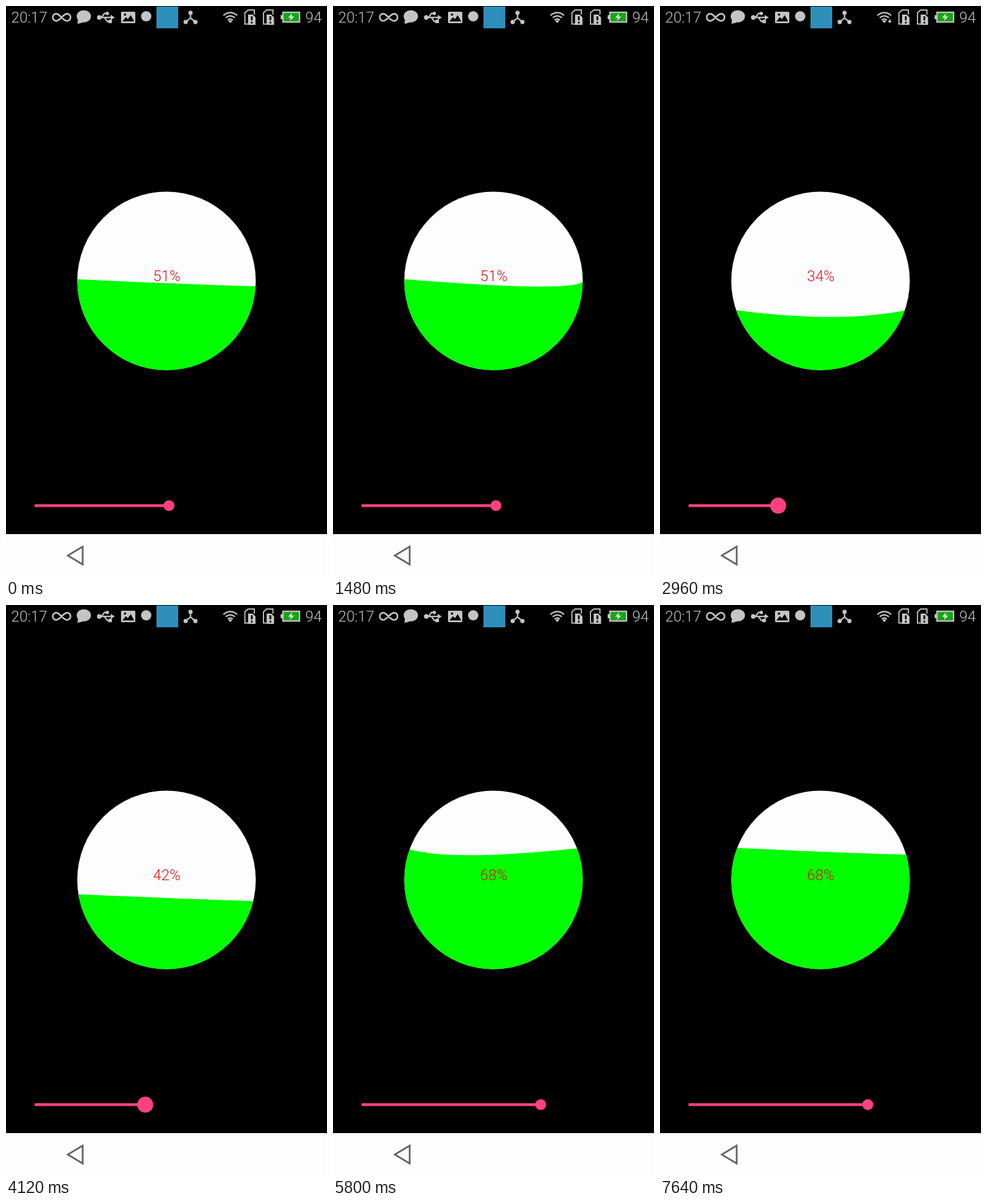
An HTML page for the animation above (7.68 s loop, 561x998 px).

```html
<!DOCTYPE html>
<html lang="en">
<head>
<meta charset="utf-8">
<title>Wave progress</title>
<style>
  html, body { margin: 0; width: 100%; height: 100%; overflow: hidden; background: #000; }
  svg { display: block; width: 100%; height: 100%; }
  text { font: 300 26px Roboto, sans-serif; }
  .line { fill: none; stroke: #c4c4c4; }
</style>
</head>
<body>
<svg viewBox="0 0 561 998">
  <defs>
    <clipPath id="disc"><circle cx="280.5" cy="480.5" r="156"/></clipPath>
    <g id="sim">
      <path class="line" stroke-width="2" d="M7 31.500H1.500V12L7 7H18V15"/>
      <path d="M7 15H15L20 20V33H7z"/>
      <path fill="#000" d="M12 18h3v7h-3zM12 27.500h3v3h-3z"/>
    </g>
  </defs>

  <!-- status bar -->
  <g fill="#c4c4c4">
    <text x="9" y="29">20:17</text>
    <path class="line" stroke-width="2.800" d="M97 20C92 14.500 90 13.500 88 13.500a6.300 6.300 0 0 0 0 12.600C90 26 92 25 97 20S104 13.500 106.500 13.500a6.300 6.300 0 0 1 0 12.600C104 26 102 25 97 20"/>
    <ellipse cx="136" cy="18" rx="12.500" ry="10.500"/>
    <path d="M126 21L125 31Q132 30 137 27z"/>
    <path class="line" stroke-width="2.400" d="M163 20H184M167 20L172 13H176M172 20L177 27H181"/>
    <circle cx="163" cy="20" r="4"/>
    <circle cx="177" cy="13" r="3"/>
    <path d="M179 24h6v6h-6zM183 15.500L190 20L183 24.500z"/>
    <rect x="201" y="10" width="25" height="20" rx="2"/>
    <path fill="#000" d="M203.500 27L209.500 19.500L213 23L218 16L224 27z"/>
    <circle cx="208" cy="15" r="2" fill="#000"/>
    <circle cx="245" cy="18" r="9"/>
    <rect x="263" y="1" width="38" height="38" fill="#2e8fba"/>
    <path class="line" stroke-width="2.400" d="M322.500 12V21L314 28M322.500 21L331 28"/>
    <circle cx="322.500" cy="12" r="3.700"/>
    <circle cx="314" cy="28" r="3.700"/>
    <circle cx="331" cy="28" r="3.700"/>
    <path class="line" stroke-width="2.600" d="M380 16.500Q392 6.500 404 16.500M384 20.500Q392 14 400 20.500M387.500 24.500Q392 21 396.500 24.500"/>
    <path d="M388.500 26Q392 23.500 395.500 26L392 30z"/>
    <path id="traffic" d="M400.500 23h2v3h2.500l-3.500 4l-3.500-4h2.500z"/>
    <use href="#sim" x="416"/>
    <use href="#sim" x="448.500"/>
    <path d="M480 16h4v7h-4z"/>
    <rect x="484" y="11" width="29" height="17" fill="#16a516" stroke="#c4c4c4" stroke-width="2.400"/>
    <path fill="#eee" d="M500 13L493 20.500H498L496 26L504 18.500H499z"/>
    <text x="523" y="29">94</text>
  </g>

  <!-- gauge -->
  <g clip-path="url(#disc)">
    <rect x="120" y="320" width="321" height="321" fill="#fdfdff"/>
    <path id="wave" fill="#0f0"/>
  </g>
  <text id="label" x="281" y="481" text-anchor="middle" fill="#e01014"></text>

  <!-- slider -->
  <path id="track" stroke="#ff4081" stroke-width="5"/>
  <circle id="thumb" cy="873.300" fill="#ff4081"/>

  <!-- navigation bar -->
  <rect y="923" width="561" height="75" fill="#fdfdff"/>
  <path d="M108 960.500L134 945V976z" fill="none" stroke="#636363" stroke-width="3"/>
</svg>
<script>
  const LOOP = 7680, STEP = 40;
  const LEFT = 124.5, SIZE = 312, BOTTOM = 636.5;
  const PERCENT = [[1560, 51], [2240, 71], [2960, 34], [3540, 64], [4120, 42], [4720, 68]];
  const RADIUS = [[1520, 9.5], [1640, 14], [5080, 14], [5200, 9.5]];
  const el = id => document.getElementById(id);

  // cosine-eased value of a key list at time t
  function at(keys, t) {
    const i = keys.findIndex(k => k[0] > t);
    if (i === 0) return keys[0][1];
    if (i < 0) return keys[keys.length - 1][1];
    const [t0, a] = keys[i - 1], [t1, b] = keys[i];
    return a + (b - a) * (1 - Math.cos(Math.PI * (t - t0) / (t1 - t0))) / 2;
  }

  // the curve's control point bounces between 0 and twice the width
  function controlX(t) {
    const moving = Math.min(t, 880) + Math.max(0, t - 1280);
    const d = (546 + 0.3477 * moving) % (4 * SIZE);
    return d < 2 * SIZE ? d : 4 * SIZE - d;
  }

  function draw(t) {
    const percent = Math.round(at(PERCENT, t));
    const y = BOTTOM - SIZE * percent / 100;
    const x = 50 + 4.605 * percent;
    el('wave').setAttribute('d',
      `M${LEFT} ${y}q${controlX(t)} 26 ${SIZE} 0V${BOTTOM}H${LEFT}z`);
    el('label').textContent = percent + '%';
    el('track').setAttribute('d', `M50 873.3H${x}`);
    el('thumb').setAttribute('cx', x);
    el('thumb').setAttribute('r', at(RADIUS, t));
    el('traffic').style.display = t > 1320 && t % 1000 >= 860 ? '' : 'none';
  }

  const start = performance.now();
  function frame() {
    const t = (performance.now() - start) % LOOP;
    draw(Math.floor(t / STEP) * STEP);
    requestAnimationFrame(frame);
  }
  frame();
</script>
</body>
</html>
```
